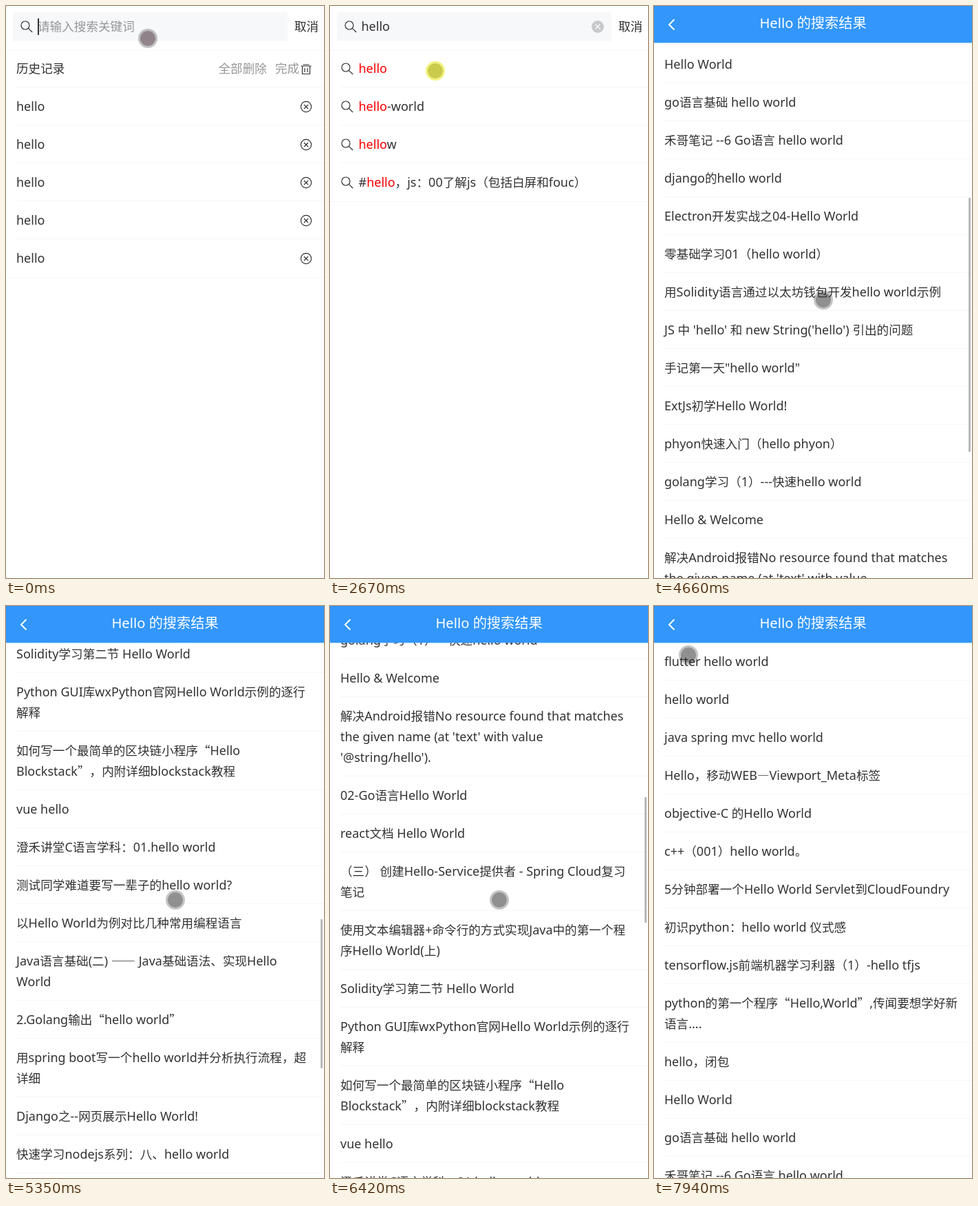
Write an HTML page that moves like this. It is 462 by 829 pixels and loops after 8 s.

```html
<!DOCTYPE html>
<html lang="zh-CN">
<head>
<meta charset="utf-8">
<title>搜索</title>
<style>
html, body { margin: 0; width: 100%; height: 100%; overflow: hidden; background: #fff; }
body { position: relative; font: 18px/30px "Noto Sans", "Open Sans", "Noto Sans CJK SC", sans-serif; color: #323233; text-spacing-trim: space-all; }
.z { font: 300 17.6px/1 "Noto Sans CJK SC", "Noto Sans CJK", sans-serif; }
.page { position: absolute; left: 0; top: 0; width: 462px; height: 829px; overflow: hidden; background: #fff; }
.abs, .page svg { position: absolute; white-space: pre; }
svg { fill: none; stroke: #323233; overflow: visible; }
.line { position: absolute; height: 1px; right: 0; background: #f6f6f7; }
.muted { color: #969799; }
.box { left: 10px; top: 9px; width: 399px; height: 42px; border-radius: 3px; background: #f7f8fa; }
#caret { top: 18px; width: 2px; height: 24px; background: #323233; }
b { font-weight: 400; color: #f00; }
#list { position: absolute; left: 0; top: 53px; width: 462px; }
.row { box-sizing: border-box; margin-left: 15px; padding: 12px 0; border-bottom: 1px solid #f6f6f7; white-space: pre; }
.head { left: 0; top: 0; width: 462px; height: 53px; background: #3296fa; color: #fff; box-shadow: 0 1px 1px rgba(50, 150, 250, .35); }
.head .title { left: 0; right: 0; top: 9px; text-align: center; font-size: 20.2px; font-weight: 500; }
.title .z { font-size: 20.2px; font-weight: 500; }
#bar { right: 2px; width: 3px; background: rgba(0, 0, 0, .28); }
#dot { left: -14px; top: -14px; width: 22px; height: 22px; border: 3px solid; border-radius: 50%; background-clip: padding-box; }
</style>
</head>
<body>
<div class="page" id="search">
  <div class="abs box"></div>
  <div class="abs" id="query" style="left:45.5px;top:14px"></div>
  <div class="abs muted cjk" id="hint" style="left:46px;top:14px">请输入搜索关键词</div>
  <div class="abs" id="caret"></div>
  <svg id="clear" style="left:389px;top:30px"><circle r="9" fill="#c8c9cc" stroke="none"/><path d="M-3.5-3.5 3.5 3.5M3.5-3.5-3.5 3.5" stroke="#fff" stroke-width="1.2"/></svg>
  <div class="abs cjk" style="left:419px;top:14px">取消</div>
  <div id="history"></div>
  <div id="tips"></div>
</div>
<div class="page" id="results">
  <div id="list"></div>
  <div class="abs head">
    <svg style="left:0;top:0"><path d="M29.5 19.5 22 27l7.5 7.5" stroke="#fff" stroke-width="2"/></svg>
    <div class="abs title cjk">Hello 的搜索结果</div>
  </div>
  <div class="abs" id="bar"></div>
</div>
<div class="abs" id="dot"></div>
<script>
const $ = id => document.getElementById(id);
const LOOP = 8000;

// Chinese runs get their own, slightly smaller face.
const cjk = s => s.replace(/[\u2014\u2018-\u201d\u3000-\u9fff\uff00-\uffef]+/g, m => `<span class="z">${m}</span>`);
const text = (x, y, s, cls = '') => `<div class="abs ${cls}" style="left:${x}px;top:${y}px">${cjk(s)}</div>`;
const line = (x, y) => `<div class="line" style="left:${x}px;top:${y}px"></div>`;
const icon = (x, y, d) => `<svg style="left:${x}px;top:${y}px" stroke-width="1.2">${d}</svg>`;
const lens = (x, y) => icon(x, y, '<circle cx="-2" cy="-2" r="6"/><path d="M2.4 2.4 8.2 8"/>');
const cross = y => icon(435.5, y, '<circle r="7.6"/><path d="M-3-3 3 3M3-3-3 3"/>');
const bin = icon(435.5, 91.5, '<path d="M-7.5-5H7.5M-4.5-7H4.5M-5.5-5V6.5H5.5V-5M-2-2V4M2-2V4"/>');

document.querySelectorAll('.cjk').forEach(e => e.innerHTML = cjk(e.textContent));
$('search').insertAdjacentHTML('beforeend', lens(30, 30) + line(0, 64));

const past = [0, 1, 2, 3, 4].map(i => {
  const y = 130 + 55 * i;
  return text(15, y, 'hello') + cross(y + 16) + line(15, y - 13);
});
$('history').innerHTML = text(15, 75, '历史记录') + text(308.5, 75, '全部删除', 'muted') +
  text(391, 75, '完成', 'muted') + bin + past.join('') + line(0, 393);

$('tips').innerHTML = ['<b>hello</b>', '<b>hello</b>-world', '<b>hello</b>w', '#<b>hello</b>，js：00了解js（包括白屏和fouc）']
  .map((s, i) => lens(25, 91 + 55 * i) + text(41.5, 75 + 55 * i, s) + (i ? line(15, 62 + 55 * i) : '')).join('') + line(0, 283);

// "|" marks a line break inside a row.
const rows = `flutter hello world
hello world
java spring mvc hello world
Hello，移动WEB—Viewport_Meta标签
objective-C 的Hello World
c++（001）hello world。
5分钟部署一个Hello World Servlet到CloudFoundry
初识python：hello world 仪式感
tensorflow.js前端机器学习利器（1）-hello tfjs
python的第一个程序“Hello,World”,传闻要想学好新|语言....
hello，闭包
Hello World
go语言基础 hello world
禾哥笔记 --6 Go语言 hello world
django的hello world
Electron开发实战之04-Hello World
零基础学习01（hello world）
用Solidity语言通过以太坊钱包开发hello world示例
JS 中 'hello' 和 new String('hello') 引出的问题
手记第一天"hello world"
ExtJs初学Hello World!
phyon快速入门（hello phyon）
golang学习（1）---快速hello world
Hello & Welcome
解决Android报错No resource found that matches|the given name (at 'text' with value|'@string/hello').
02-Go语言Hello World
react文档 Hello World
（三） 创建Hello-Service提供者 - Spring Cloud复习|笔记
使用文本编辑器+命令行的方式实现Java中的第一个程|序Hello World(上)
Solidity学习第二节 Hello World
Python GUI库wxPython官网Hello World示例的逐行|解释
如何写一个最简单的区块链小程序“Hello|Blockstack”，内附详细blockstack教程
vue hello
澄禾讲堂C语言学科：01.hello world
测试同学难道要写一辈子的hello world?
以Hello World为例对比几种常用编程语言
Java语言基础(二) —— Java基础语法、实现Hello|World
2.Golang输出“hello world”
用spring boot写一个hello world并分析执行流程，超|详细
Django之--网页展示Hello World!
快速学习nodejs系列：八、hello world
hello python
Java学习笔记 hello world
第一个C语言程序 hello world
hello vue入门
Go语言Hello World示例
rust初学 hello world
Hello World的由来
python基础（1）hello world
react hello world
spring boot入门 hello world
hello，webpack
从hello world开始学编程`.split('\n');
$('list').innerHTML = rows.map(r => `<div class="row">${cjk(r).replace(/\|/g, '\n')}</div>`).join('');

// Bursts of redraws: start, end, count.
const bursts = [[0, 0, 1], [260, 260, 1], [400, 400, 1], [560, 560, 1], [710, 710, 1], [860, 860, 1], [1410, 1410, 1],
  [1880, 2670, 11], [2760, 3190, 7], [3500, 3650, 3], [3880, 4660, 11], [4760, 5500, 11], [5580, 5650, 2],
  [6040, 6040, 1], [6190, 6420, 4], [6650, 6890, 4], [7050, 7220, 3], [7360, 7940, 8]];
const ticks = bursts.flatMap(([a, b, n]) => Array.from({ length: n }, (_, i) => n > 1 ? a + (b - a) * i / (n - 1) : a));
const snap = t => ticks.findLast(k => k <= t + 4);

const typing = [260, 400, 560, 710, 860];
const pointer = [[1800, 206, 47], [2280, 164, 115], [2520, 153, 94], [2760, 153, 94], [3190, 214, 279], [3430, 214, 279],
  [3650, 256, 432], [3880, 252, 516], [4110, 246, 426], [7277, 246, 426], [7940, 50, 71]];
const scroll = [[4115, 0], [4660, 631], [5000, 1090], [5352, 1756], [5500, 2310], [5580, 2385], [5650, 2407],
  [6113, 2407], [6420, 1271], [6570, 1271], [6890, 14], [6970, 14], [7220, 0]];
const slide = [[2700, 462], [2832, 230], [2904, 80], [2976, 15], [3048, 0]];

function at(keys, t) {
  const i = keys.findIndex(k => k[0] > t);
  if (i === 0) return keys[0].slice(1);
  if (i < 0) return keys[keys.length - 1].slice(1);
  const a = keys[i - 1], b = keys[i], p = (t - a[0]) / (b[0] - a[0]);
  return a.slice(1).map((v, j) => v + (b[j + 1] - v) * p);
}

const show = (id, on) => $(id).style.visibility = on ? 'visible' : 'hidden';

function render(time) {
  const t = snap(time);
  const count = typing.filter(k => k <= t).length;
  $('query').textContent = 'hello'.slice(0, count);
  $('caret').style.left = (count ? 44.5 + $('query').getBoundingClientRect().width : 46) + 'px';
  show('caret', t < 1880);
  show('hint', !count);
  show('clear', count);
  show('history', t < 1410);
  show('tips', t >= 1410);

  const [x, y] = at(pointer, t);
  const dot = $('dot').style;
  const pressed = t > 2580 && t < 2760;
  dot.transform = `translate(${x}px,${y}px)`;
  dot.backgroundColor = pressed ? 'rgba(180,180,0,.7)' : t < 1880 ? 'rgba(40,15,25,.5)' : 'rgba(35,35,35,.5)';
  dot.borderColor = pressed ? 'rgba(230,230,0,.5)' : 'rgba(35,40,45,.27)';

  show('results', t >= 2760);
  $('results').style.transform = `translateX(${at(slide, t)[0]}px)`;
  const [top] = at(scroll, t);
  $('list').style.transform = `translateY(${-top}px)`;

  // The thumb shrinks as more rows are loaded.
  const length = t < 5000 ? 368 : t < 5500 ? 216 : 182;
  show('bar', t > 4115 && t < 6040 || t >= 6190 && t < 7600);
  $('bar').style.top = top * length / 836 + 'px';
  $('bar').style.height = length + 'px';
}

const start = performance.now();
function frame() {
  render((performance.now() - start) % LOOP);
  requestAnimationFrame(frame);
}
frame();
</script>
</body>
</html>
```
